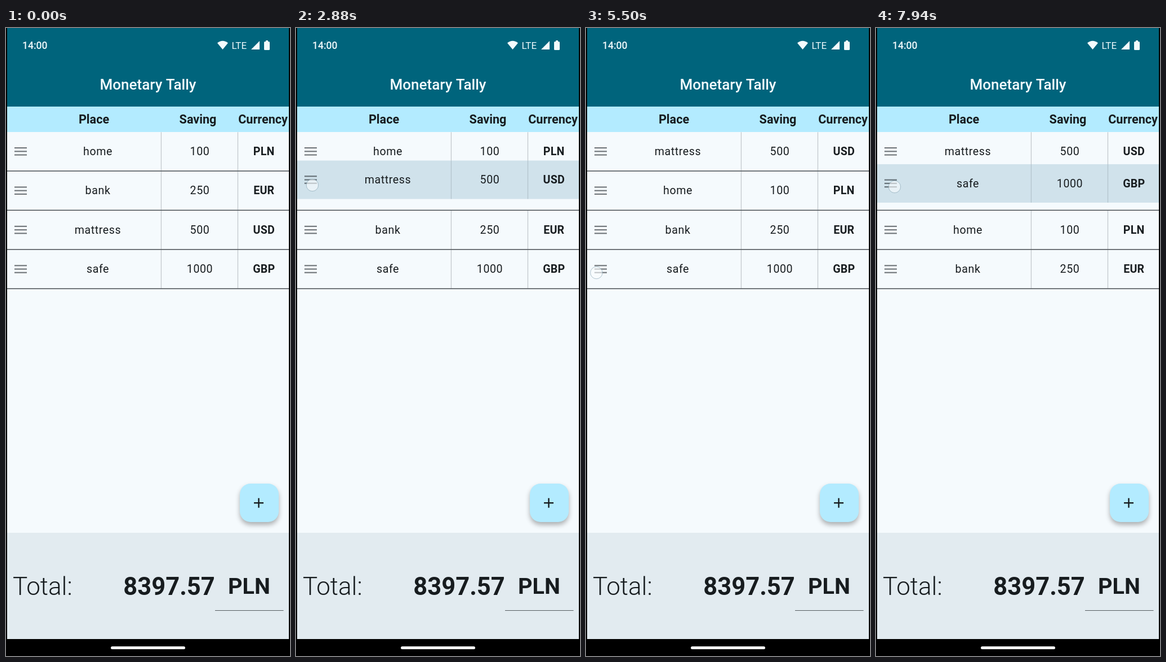
An HTML page with a canvas for the animation above (8000 ms loop, 504 px wide and 1111 px high).

```html
<!DOCTYPE html>
<html lang="en">
<head>
<meta charset="utf-8">
<title>Savings list</title>
<style>
html, body { margin: 0; width: 100%; height: 100%; overflow: hidden; background: #000; }
canvas { display: block; }
</style>
</head>
<body>
<canvas id="stage" width="504" height="1111"></canvas>
<script>
const ctx = document.getElementById('stage').getContext('2d');
const LOOP = 8000, STEP = 62.5, SETTLE = 250;
const TOP = 218.3, PITCH = 69.4;
const INK = '#171c1f';

const slotY = slot => TOP + slot * PITCH;
const clamp = v => Math.max(0, Math.min(1, v));
const ease = v => v < 0.5 ? 2 * v * v : 1 - 2 * (1 - v) ** 2;

// shifts: times at which a row makes room by moving one slot down
const rows = [
  { place: 'home', saving: '100', currency: 'PLN', slot: 0, shifts: [3015, 7560] },
  { place: 'bank', saving: '250', currency: 'EUR', slot: 1, shifts: [2414, 6970] },
  { place: 'mattress', saving: '500', currency: 'USD', slot: 2, shifts: [] },
  { place: 'safe', saving: '1000', currency: 'GBP', slot: 3, shifts: [] }
];

// path: time, row centre, touch x, touch y
const drags = [
  { row: rows[2], lift: 1625, end: 4062, slot: 0, path: [
    [1187, 357.1, 22, 368], [2000, 357.1, 22, 368], [2250, 341, 24, 353],
    [2875, 268.5, 29, 278], [3300, 220, 32, 231], [3625, 216, 33, 227], [3812, 208, 33, 219]] },
  { row: rows[3], lift: 5937, end: LOOP + 200, slot: 0, path: [
    [5500, 426.5, 18.5, 433], [6375, 426.5, 18.5, 433], [6970, 391.5, 23, 398],
    [7187, 368.5, 25, 373], [7937, 275, 33, 281], [8000, 267, 33, 273]] }
];

function follow(path, t) {
  const i = path.findIndex(p => p[0] > t);
  if (i < 0) return path[path.length - 1];
  const a = path[i - 1], b = path[i], f = (t - a[0]) / (b[0] - a[0]);
  return a.map((v, k) => v + (b[k] - v) * f);
}

function rect(x, y, w, h, color) {
  ctx.fillStyle = color;
  ctx.fillRect(x, y, w, h);
}

function round(x, y, w, h, r, color) {
  ctx.fillStyle = color;
  ctx.beginPath();
  ctx.roundRect(x, y, w, h, r);
  ctx.fill();
}

function text(str, x, y, size, weight, { color = INK, align = 'center', gap = 0 } = {}) {
  ctx.font = `${weight} ${size}px Roboto, sans-serif`;
  ctx.letterSpacing = gap + 'px';
  ctx.textAlign = align;
  ctx.fillStyle = color;
  ctx.fillText(str, x, y);
}

function statusBar() {
  const color = '#f2fafc';
  text('14:00', 29, 37, 17.5, 500, { color, align: 'left' });
  text('LTE', 400.5, 36.5, 17, 400, { color, align: 'left' });
  ctx.fillStyle = color;
  ctx.fill(new Path2D('M375 26.5Q384.5 19 394 26.5L384.5 38Z'));
  ctx.fill(new Path2D('M450 23V38H435Z'));
  round(458, 24, 10, 15, 1.5, color);
  rect(461, 22, 4, 3, color);
}

function chrome() {
  rect(0, 0, 504, 1111, '#000');
  rect(2, 0, 500, 139, '#00647c');
  statusBar();
  text('Monetary Tally', 252, 109, 26, 500, { color: '#f4fcff' });
  rect(2, 139, 500, 45, '#b3ebff');
  text('Place', 156, 169, 21.6, 700);
  text('Saving', 340.5, 169, 21.6, 700);
  text('Currency', 456, 169, 21.6, 700);
  rect(2, 184, 500, 709, '#f5fafd');
  rect(2, 893, 500, 188, '#e2ebf0');

  ctx.save();
  ctx.shadowColor = 'rgba(0,0,0,.3)';
  ctx.shadowBlur = 9;
  ctx.shadowOffsetY = 5;
  round(415, 806, 69, 68, 19, '#b3ebff');
  ctx.restore();
  rect(440, 839, 17, 2.4, INK);
  rect(447.3, 831.7, 2.4, 17, INK);

  text('Total:', 12, 1003, 44, 300, { align: 'left' });
  text('8397.57', 289.5, 1003, 43.5, 700);
  text('PLN', 431.5, 1001, 39.5, 700);
  rect(371, 1030, 121.5, 1, '#555c60');
  round(186, 1094, 132, 5, 2.5, '#fff');
}

function drawRow(row, y, lifted) {
  if (lifted) rect(2, y - 34, 500, 68, '#d0e2eb');
  for (const x of [274.8, 410.8]) rect(x, y - 34, 1.3, 68, lifted ? '#b4c5cd' : '#c3c9cd');
  for (const d of [-6.2, 0, 6.2]) rect(15, y + d - 1.1, 22, 2.2, lifted ? '#667279' : '#74797d');
  text(row.place, 163, y + 6.7, 19.6, 400, { gap: 0.6 });
  text(row.saving, 344, y + 6.7, 19.6, 400, { gap: 0.6 });
  text(row.currency, 457.7, y + 6.7, 19.6, 700, { gap: 0.2 });
}

function touch(x, y) {
  ctx.beginPath();
  ctx.arc(x, y, 10.7, 0, 7);
  ctx.fillStyle = 'rgba(250,253,255,.6)';
  ctx.fill();
  ctx.lineWidth = 1;
  ctx.strokeStyle = 'rgba(105,140,158,.5)';
  ctx.stroke();
}

function restY(row, t) {
  const drag = drags.find(d => d.row === row);
  if (drag && t >= drag.end) return slotY(drag.slot);
  return slotY(row.slot + row.shifts.reduce((s, at) => s + ease(clamp((t - at) / SETTLE)), 0));
}

function draw(t) {
  chrome();
  const drag = drags.find(d => t >= d.path[0][0] && t < d.end);
  const lifted = drag && t >= drag.lift;
  for (const row of rows) {
    if (!lifted || row !== drag.row) drawRow(row, restY(row, t), false);
  }
  for (let i = 0; i < 4; i++) rect(2, 252.3 + i * PITCH, 500, 1.4, '#3c4246');
  if (!drag) return;

  const release = drag.path[drag.path.length - 1][0];
  let [, y, x, ty] = follow(drag.path, t);
  if (t >= release) y += (slotY(drag.slot) - y) * ease(clamp((t - release) / SETTLE));
  if (lifted) drawRow(drag.row, y, true);
  if (t < release) touch(x, ty);
}

const start = performance.now();
function tick() {
  const t = (performance.now() - start) % LOOP;
  draw(Math.min(127, Math.floor((t + 3) / STEP)) * STEP);
  requestAnimationFrame(tick);
}
tick();
</script>
</body>
</html>
```
